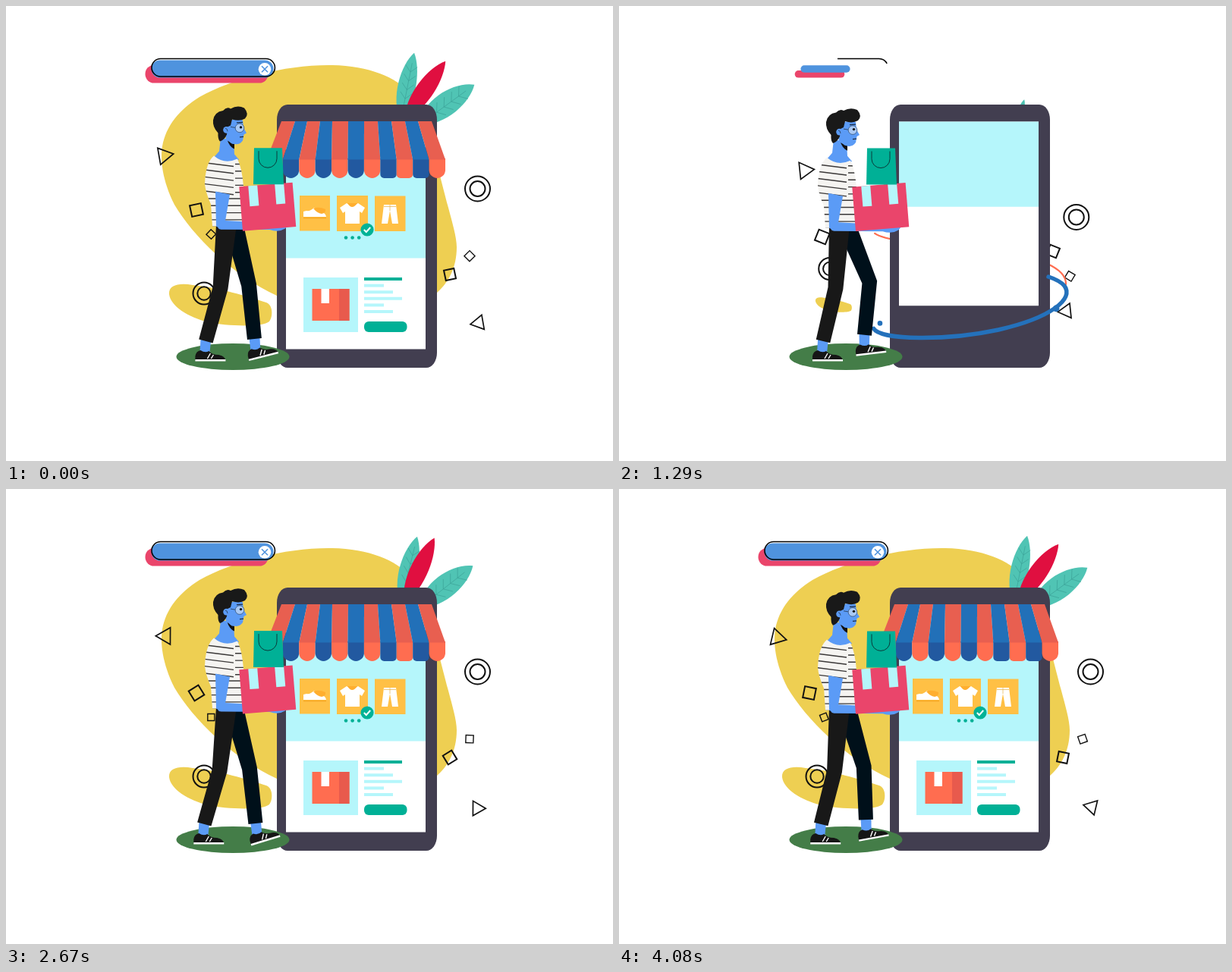
These frames come from a looping animation (800x600 px, 4110 ms). An HTML page with a canvas:

```html
<!DOCTYPE html>
<html>
<head>
<meta charset="utf-8">
<style>
html, body { margin: 0; width: 100%; height: 100%; overflow: hidden; background: #fff; }
canvas { display: block; width: 800px; height: 600px; }
</style>
</head>
<body>
<canvas id="stage" width="800" height="600"></canvas>
<script>
const c = document.getElementById('stage').getContext('2d');
const LOOP = 4110, CUT = 125, RAD = Math.PI / 180, TAU = Math.PI * 2;
const BLUE = '#5b9bf6', PINK = '#ea456b', GREEN = '#00b096', CYAN = '#b5f6fb',
  DARK = '#423e50', YELLOW = '#eecf52', INK = '#181818', NAVY = '#00101a',
  ORANGE = '#ff6d50', SKY = '#2471bb';

const clamp = x => Math.max(0, Math.min(1, x));
const span = (t, start, dur) => clamp((t - start) / dur);
const out = (u, n = 3) => 1 - Math.pow(1 - u, n);
const back = u => 1 + 2.3 * Math.pow(u - 1, 3) + 1.3 * Math.pow(u - 1, 2);

function keys(t, times, vals, smooth) {
  if (t <= times[0]) return vals[0];
  for (let i = 1; i < times.length; i++) {
    if (t <= times[i]) {
      let u = (t - times[i - 1]) / (times[i] - times[i - 1]);
      if (smooth) u = u * u * (3 - 2 * u);
      return vals[i - 1] + (vals[i] - vals[i - 1]) * u;
    }
  }
  return vals[vals.length - 1];
}

function fill(path, color) { c.fillStyle = color; c.fill(new Path2D(path)); }
function line(path, color, width) {
  c.strokeStyle = color; c.lineWidth = width; c.stroke(new Path2D(path));
}
function box(x, y, w, h, color, r = 0) {
  c.fillStyle = color;
  c.beginPath();
  c.roundRect(x, y, w, h, r);
  c.fill();
}
function disc(x, y, r, color) {
  if (r <= 0) return;
  c.fillStyle = color;
  c.beginPath();
  c.arc(x, y, r, 0, TAU);
  c.fill();
}
function ring(x, y, r, w) {
  c.strokeStyle = '#111'; c.lineWidth = w;
  c.beginPath();
  c.arc(x, y, r, 0, TAU);
  c.stroke();
}
function poly(pts, color) {
  c.fillStyle = color;
  c.beginPath();
  pts.forEach(p => c.lineTo(p[0], p[1]));
  c.fill();
}
function at(x, y, deg, scale, draw) {
  if (scale <= 0) return;
  c.save();
  c.translate(x, y);
  c.rotate(deg * RAD);
  c.scale(scale, scale);
  draw();
  c.restore();
}
// Scales a drawing made in stage coordinates around a point.
const pop = (x, y, s, draw) => at(x, y, 0, s, () => { c.translate(-x, -y); draw(); });

function rings(t) {
  if (t >= 1105) return;
  const blue = 313 * out(span(t, 125, 833), 2);
  const pink = 313 * out(span(t, 258, 833), 2);
  const white = 325 * out(span(t, 372, 730), 2);
  disc(380, 300, blue, BLUE);
  if (blue > 1) at(380, 300, 0, blue / 255, () => {
    const part = TAU * 215.5 / 20;
    c.save();
    c.rotate(-99 * RAD);
    c.setLineDash([part * .62, part * .38]);
    ring(0, 0, 215.5, 1.6);
    c.restore();
    [[-194, -168], [160, -163], [-192, 126], [138, 193]].forEach(p => disc(p[0], p[1], 1.4, '#000'));
  });
  disc(380, 300, pink, PINK);
  disc(380, 300, white, '#fff');
}

function blobs(t) {
  pop(400, 232, out(span(t, 1240, 500)), () => fill(
    'M430 78C478 79 515 94 532 115C556 150 573 230 583 266C588 285 594 305 594 318C594 345 583 365 568 378' +
    'C520 400 430 412 357 382C300 356 246 303 222 262C206 230 203 202 206 185' +
    'C211 158 228 137 255 120C300 95 370 77 430 78Z', YELLOW));
  pop(283, 394, out(span(t, 1200, 670)), () => fill(
    'M215 380C214 367 230 365 246 368C280 371 318 383 343 391C352 394 352 410 347 416' +
    'C338 424 290 422 266 417C240 410 217 396 215 380Z', YELLOW));
}

function triangle(x, y, r, turn) {
  at(x, y, turn, 1, () => {
    c.translate(3.4 * Math.cos(53 * RAD), 3.4 * Math.sin(53 * RAD));
    c.beginPath();
    for (const a of [107, 227, 347]) c.lineTo(r * Math.cos(a * RAD), r * Math.sin(a * RAD));
    c.closePath();
    c.lineWidth = 1.7; c.strokeStyle = '#111';
    c.stroke();
  });
}
function square(x, y, size, turn, w) {
  at(x, y, turn, 1, () => {
    c.lineWidth = w; c.strokeStyle = '#111';
    c.strokeRect(-size / 2, -size / 2, size, size);
  });
}

function ornaments(t) {
  if (t < 1150) return;
  const k = 5.16 * Math.pow(1 - span(t, 1150, 500), 5);
  const T = t > LOOP ? t - 135 : t;
  const turn = .222 * (T - 1800), quick = .24 * (T - 2670);
  triangle(211.5 + 32 * k, 197 + 23 * k, 12.8, turn);
  triangle(619.7 - 29 * k, 418 - 19 * k, 11.2, turn + 180);
  square(251 + 17 * k, 269 + 36 * k, 15, turn + 45, 2);
  square(585 - 13 * k, 354 - 31 * k, 13.5, turn + 45, 2);
  square(270.3 + 17 * k, 301 + 20 * k, 9, quick, 1.4);
  square(611 - 17 * k, 329.7 + 27 * k, 10, quick + 2, 1.4);
  [[261 + 17 * k, 379 - 33 * k, 14.5, 8.7], [621.5 - 19 * k, 241 + 38 * k, 16.5, 10]].forEach(o => {
    ring(o[0], o[1], o[2], 2);
    ring(o[0], o[1], o[3], 2);
  });
}

function leaf(x, y, len, w, deg, color, vein) {
  at(x, y, deg, 1, () => {
    fill(`M0 0C${-w * 1.5} ${-len * .3} ${-w * 1.1} ${-len * .8} 0 ${-len}C${w * .9} ${-len * .8} ${w * 1.3} ${-len * .35} 0 0Z`, color);
    if (!vein) return;
    let d = `M0 0V${-len * .85}`;
    for (let i = 1; i < 5; i++) {
      const v = -len * (.2 + i * .13);
      d += `M${-w * .6} ${v - 8}L0 ${v}L${w * .6} ${v - 8}`;
    }
    line(d, vein, .6);
  });
}
function plant(t) {
  const times = [1290, 1800, 2670, 3180, 4080];
  const sway = vals => keys(t, times, vals, true);
  pop(530, 148, out(span(t, 1215, 480), 2), () => {
    leaf(520, 152, 92, 13, 11.3 + sway([4, 21, 2.5, 5, 0]), '#50c4b4', '#3a9f95');
    leaf(525, 152, 96, 13, 34.4 + sway([30, 6, -10, 7, 0]), '#e00f40');
    leaf(543, 158, 92, 17, 53.9 + sway([20, 17, -2, 5, 0]), '#50c4b4', '#3a9f95');
  });
}

function searchBar(t) {
  const s = t < 1230 ? 0 : back(span(t, 1230, 560));
  pop(264.5, 89.8, s, () => box(183.5, 78, 162, 23.5, PINK, 11.5));
  pop(272, 83, s, () => box(191.5, 71.5, 161, 23, '#4f93de', 11.5));
  const drawn = span(t, 1220, 370);
  if (drawn > 0) {
    c.save();
    if (drawn < 1) c.setLineDash([352 * drawn, 400]);
    line('M288 69.5H342.7A11.75 11.75 0 0 1 342.7 93H203.7A11.75 11.75 0 0 1 203.7 69.5Z', '#000', 1.5);
    c.restore();
  }
  const u = span(t, 1500, 600), x = 205 + 136 * (u * u * (3 - 2 * u));
  pop(x, 83.3, out(span(t, 1480, 150)), () => {
    disc(x, 83.3, 8.3, '#fff');
    line(`M${x - 4} 79.3l8 8m0 -8l-8 8`, '#4f93de', 1.6);
  });
}

function phone(t) {
  const u = span(t, CUT, 955);
  const s = Math.pow(u, .9), a = 200 * Math.pow(1 - u, 1.24) * RAD;
  const turn = Math.abs(Math.cos(a));
  const face = 211 * s * turn, edge = 38 * s * Math.abs(Math.sin(a));
  const h = 347 * s, left = 462.5 - (face + edge) / 2, top = 303.5 - h / 2;
  if (face + edge < 1) return;
  const front = Math.cos(a) > 0;
  const fx = front ? left + edge : left, ex = front ? left : left + face;
  // The corners on the far side stay visible as a slant when the face is narrow.
  const near = { x: 14 * turn * s, y: 20 * turn * s }, far = { x: Math.min(14, face * .9), y: 20 * s };
  c.fillStyle = DARK;
  c.beginPath();
  c.roundRect(fx, top, face, h, front ? [near, far, far, near] : [far, near, near, far]);
  c.fill();
  if (edge > .5) {
    box(ex, top, edge + 1, h, '#0c1150');
    box(ex, top, 1, h, SKY);
  }
}

function awning(t) {
  const p = out(span(t, 1420, 300));
  if (!p) return;
  const tops = [363, 381, 397, 414, 430, 451, 472, 490, 508, 526, 543, 561];
  const low = i => 343.4 + 21.42 * i;
  c.save();
  c.beginPath();
  c.rect(320, 152, 280, 77 * p);
  c.clip();
  for (let i = 0; i < 11; i++) {
    const x = low(i), r = i > 6 && i < 10 ? 5 : 10.7;
    box(x, 201, 21.42, 26, i % 2 ? '#2259a0' : ORANGE, [0, 0, r, r]);
    poly([[tops[i], 152], [tops[i + 1], 152], [low(i + 1), 202.5], [x, 202.5]], i % 2 ? '#2270b8' : '#e85f50');
  }
  c.restore();
}

function screen(t) {
  const white = out(span(t, 1100, 450)), cyan = out(span(t, 1150, 507));
  if (white) box(369, 152.5, 184, 300 * white, '#fff');
  if (cyan) box(369, 152.5, 184, 180 * cyan, CYAN);
  awning(t);
  const show = (x, y, start, draw) => pop(x, y, out(span(t, start, 200)), draw);
  show(407, 273, 1460, () => {
    box(387, 250, 40, 46.5, '#ffc045');
    fill('M392 271L396 270Q401 271 406 266Q411 272 419 273Q422 275 422 278H392Z', '#fff');
    fill('M405 267Q412 264 421 268Q422 273 416 274Q410 273 405 267Z', '#ffae2e');
    line('M392 279.5H422', '#f5a623', 1.5);
  });
  show(456.5, 273, 1510, () => {
    box(436, 250, 41, 47, '#ffc045');
    fill('M440 266L449 260Q456 266 464 260L473 266L469 273L466 271V287H447V271L444 273Z', '#fff');
    fill('M450 260Q456 270 463 260Z', '#ffae2e');
  });
  show(506, 274, 1560, () => {
    box(486, 250.5, 40.5, 46.5, '#ffc045');
    fill('M498 262H514L517 287H509L506 270L503 287H495Z', '#fff');
    line('M498 264.5H514M506 262V270', '#e3b04a', .7);
  });
  show(476, 295, 1620, () => {
    disc(476, 295, 8.6, '#00b296');
    line('M471.8 295l3 3l5.4 -6', '#fff', 2);
  });
  for (let i = 0; i < 3; i++) disc(448 + 8.6 * i, 305.5, 2.3 * span(t, 1600 + 40 * i, 100), GREEN);
  show(428, 394, 1500, () => {
    box(392, 358, 72, 72, CYAN);
    box(403.5, 373, 49, 42, ORANGE);
    box(439, 373, 13.5, 42, '#e85a4d');
    box(415.5, 373, 10.5, 19, '#fff');
  });
  [50, 26, 38, 50, 26, 38].forEach((w, i) => {
    const p = out(span(t, 1500 + 35 * i, 110));
    if (p) box(472, 358 + 8.6 * i, w * p, 4, i ? CYAN : GREEN);
  });
  show(500, 423, 1620, () => box(472, 416, 56.5, 14, GREEN, 6));
}

const ORBIT = 'M335 424C340 441 430 442 500 427C570 411 600 386 587 369C582 363 575 360 566 357';
function ribbons(t, front) {
  c.lineCap = 'round';
  if (!front && t > 460 && t < 830) {
    const w = Math.sin(Math.PI * span(t, 460, 370));
    line(`M473 237L${473 + 55 * w} 241.5`, SKY, 2.2);
    line(`M${473 + 55 * w} 241.5L${473 + 30 * w} 243`, SKY, 1.6);
    line(`M473 231L${473 + 33 * w} 233`, ORANGE, 1.2);
  }
  if (t > 900 && t < 1560) {
    const grow = span(t, 900, 300), gone = span(t, 1290, 270), len = 420;
    c.save();
    c.setLineDash([len * (grow - gone), 2000]);
    c.lineDashOffset = -len * gone;
    if (grow > gone) {
      if (front) line(ORBIT, SKY, 5.5);
      else line('M336 299C350 312 430 316 500 324C550 330 590 345 589 367', ORANGE, 2.2);
    }
    c.restore();
  }
  c.lineCap = 'butt';
}
function sparks(t) {
  const w = Math.sin(Math.PI * span(t, 400, 420)), d = (t - 600) / 12;
  disc(456 - d, 249 - d * .5, 2.2 * w, SKY);
  disc(451 - d, 369 + d * .5, 5 * w, SKY);
  disc(515 + d, 291, 2 * w, ORANGE);
  disc(481 + d, 332 + d * .5, 3.6 * w, ORANGE);
  const v = Math.sin(Math.PI * span(t, 1050, 480)), e = (t - 1290) / 12;
  disc(344 - e * .5, 418.5 - e, 3.3 * v, SKY);
  disc(576 + e, 399 - e, 4.4 * v, SKY);
}

function foot(p, stance) {
  if (stance) return { x: 259 + 70 * (1 - p), y: 454, a: p < .12 ? -19 * (1 - p / .12) : 0 };
  return {
    x: 259 + 71 * p + 4 * Math.min(1, p * 4) * (1 - p * .3),
    y: 454 - 21 * Math.sin(Math.PI * p),
    a: Math.min(p * 90, 78 - 97 * p)
  };
}

function leg(hx, hy, f, color) {
  const A = f.a * RAD, cx = f.x + Math.cos(A) + 12 * Math.sin(A), cy = f.y - 12 * Math.cos(A) + Math.sin(A);
  const dx = cx - hx, dy = cy - hy, d = Math.hypot(dx, dy);
  // A fully straight leg stretches a little to reach the ground.
  const fit = Math.max(1, d / 145.5), L1 = 76 * fit, L2 = 70 * fit;
  const dir = Math.atan2(dy, dx), bend = Math.acos((L1 * L1 + d * d - L2 * L2) / (2 * L1 * d));
  const kx = hx + L1 * Math.cos(dir - bend), ky = hy + L1 * Math.sin(dir - bend);
  const shin = Math.atan2(cy - ky, cx - kx), knee = (shin + dir - bend) / 2;
  const side = (x, y, ang, w) => [x + w * Math.sin(ang), y - w * Math.cos(ang)];
  poly([side(cx, cy - 3, shin, 7), side(cx, cy - 3, shin, -7), [f.x - 7, f.y + 4], [f.x + 6, f.y + 4]], BLUE);
  at(f.x, f.y, f.a, 1, () => {
    fill('M-13 14V8Q-12 1 -6 0Q0 4 5 1Q9 6 18 6Q27 8 27 14Z', '#161616');
    box(-13, 12, 40, 2.5, '#fff');
    line('M3 11L7 4M8 11L11 6', '#fff', 1.4);
  });
  poly([[hx - 13.5, hy - 5], [hx + 13.5, hy - 5], side(kx, ky, knee, 10), side(cx, cy, shin, 9.5),
    side(cx, cy, shin, -9.5), side(kx, ky, knee, -10)], color);
}

function torso(carry) {
  fill('M283 174L300 178L301 196L307 203Q290 216 274 200L281 192Z', BLUE);
  fill('M291 175Q297 184 301 182V189Q294 186 291 175Z', '#111');
  c.save();
  const shirt = new Path2D('M274 198Q288 210 305 202Q311 214 313 238V291H272L270 262Q263 246 262 235Q263 207 274 198Z');
  c.fillStyle = '#f5f4f1';
  c.fill(shirt);
  c.clip(shirt);
  for (let i = 0; i < 10; i++) {
    const y = 208 + 9.3 * i;
    line(i < 5 ? `M260 ${y - 1}L300 ${y + 4}M302 ${y + 1}H314` : `M260 ${y}H314`, '#3a3838', 1.4);
  }
  c.restore();
  fill('M276 245L295 249L289 284L285 294L277 291Z', BLUE);
  at(282, 288, -7 + 11 * carry, 1, () => fill(
    'M-5 -5L7 -5L64 -6Q72 -14 78 -13Q82 -12 76 -7L88 -8Q93 -7 86 0Q78 6 66 3L2 7Q-5 7 -5 -5Z', BLUE));
}

function head() {
  fill('M287 158Q296 147 312 151L313 161L317 168L313.5 170L312 178Q307 185 299 182L290 177Z', BLUE);
  fill('M282 179Q279 176 279.5 168Q272 160 273 151Q275 140 286 138.5Q291 133 296 136Q305 131 314 135' +
    'Q321 143 315 149Q308 153 298 150L296 158L292 160L291 170Q288 177 282 179Z', '#191919');
  disc(290.5, 164, 4.3, BLUE);
  line('M289 162q3 0 3 4M296 160L302 161', '#23364f', .8);
  disc(308, 161.5, 5.8, '#a9c9f5');
  line('M302.2 161.5a5.8 5.8 0 1 0 11.6 0a5.8 5.8 0 1 0 -11.6 0', '#34547c', .8);
  disc(309.5, 160.5, 1.7, '#111');
  line('M304 154.5L312 154M308 173.5L313 173', '#1c2c44', 1.3);
}

function parcels(t, b) {
  const e = out(span(t, 555, 400));
  if (t >= 555) at(344.5 - 2 * (1 - e), 264.5 - 305 * (1 - e) + b * .12, -4.6, .52 + .48 * e, () => {
    box(-35, -29, 70.5, 58.5, PINK);
    box(-23, -29, 12, 27, CYAN);
    box(12, -29, 12, 27, CYAN);
  });
  const g = out(span(t, 790, 380));
  if (t >= 790) at(346, 211.3 - 290 * (1 - g) + b * .12, 0, .5 + .5 * g, () => {
    fill('M-19 -24H18L20 24H-20Z', GREEN);
    line('M-13 -20V-10A12 12 0 0 0 11 -10V-20', '#0b3b3a', 1);
  });
}

function man(t, clock) {
  const phase = keys(clock, [0, 600, 1290, 1800, 2670, 3180, 4080, LOOP],
    [.95, 1.78, 2.87, 3.63, 4.98, 5.8, 6.91, 6.95]);
  const n = Math.floor(phase), p = phase - n, blackDown = n % 2 === 0;
  const b = 10.8 * Math.pow(Math.sin(Math.PI * p), .8) - 3;
  const carry = out(span(t, 780, 200));
  c.fillStyle = '#447d48';
  c.beginPath();
  c.ellipse(299, 462.5, 74.5, 17.5, 0, 0, TAU);
  c.fill();
  leg(299.5, 293.5 + b * .5, foot(p, !blackDown), NAVY);
  leg(290.5, 293.5 + b * .5, foot(p, blackDown), INK);
  at(0, b * .8, 0, 1, () => torso(carry));
  at(0, b, 0, 1, head);
  parcels(t, b);
}

function draw(clock) {
  // The opening moment still shows the settled scene, until the rings start.
  const t = clock < CUT ? clock + LOOP : clock;
  c.fillStyle = '#fff';
  c.fillRect(0, 0, 800, 600);
  rings(t);
  blobs(t);
  ornaments(t);
  plant(t);
  searchBar(t);
  ribbons(t, false);
  phone(t);
  screen(t);
  ribbons(t, true);
  sparks(t);
  man(t, clock);
}

const began = performance.now();
function tick() {
  draw((performance.now() - began) % LOOP);
  requestAnimationFrame(tick);
}
draw(0);
requestAnimationFrame(tick);
</script>
</body>
</html>
```
